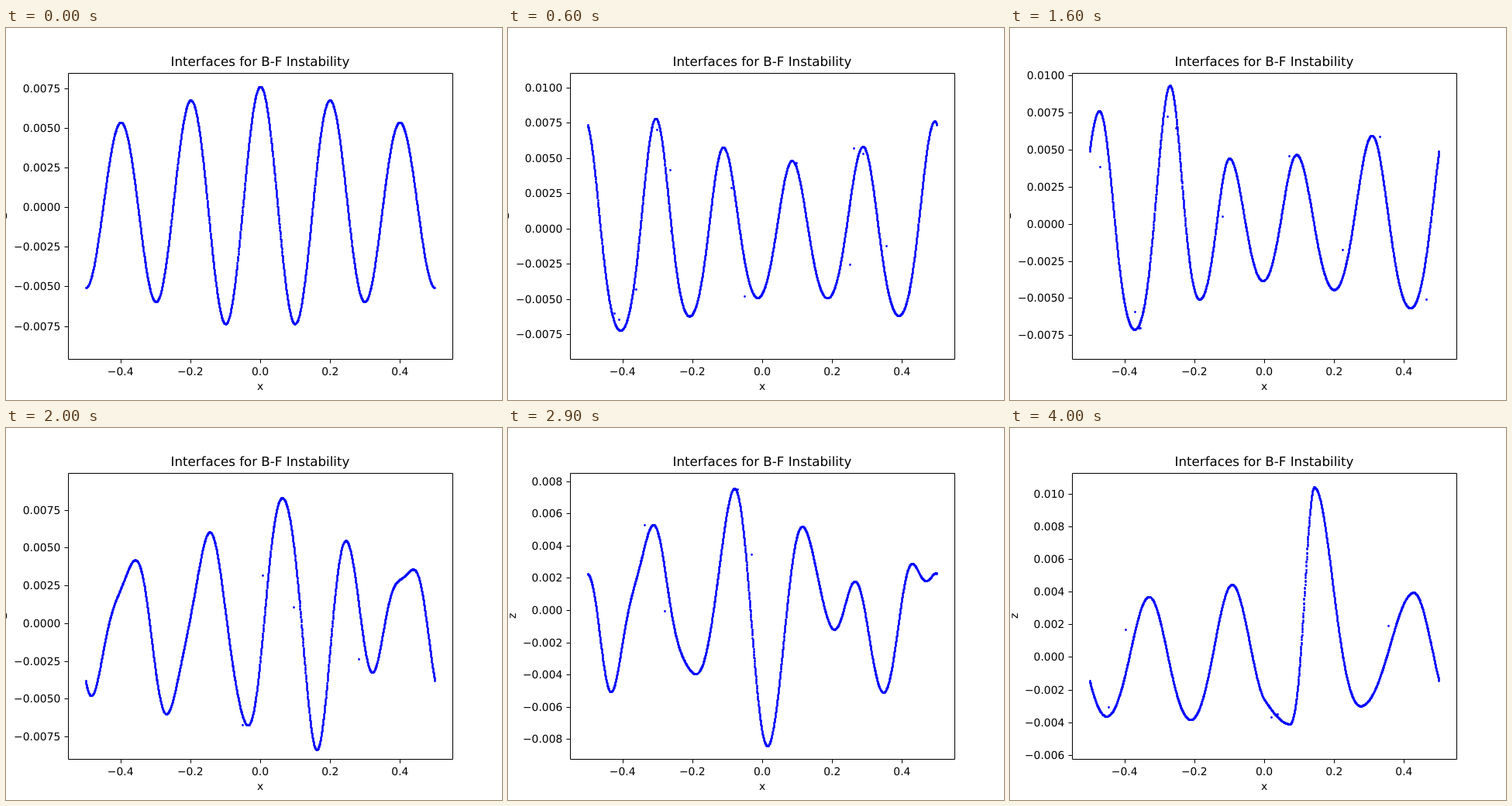
Recreate the animation shown at these times as an HTML page. Size 640 by 480 pixels, loop 4100 ms.

```html
<!DOCTYPE html>
<html lang="en">
<head>
<meta charset="utf-8">
<title>Interfaces for B-F Instability</title>
<style>
  html, body { margin: 0; width: 100%; height: 100%; overflow: hidden; background: #fff; }
  svg { display: block; width: 640px; height: 480px; }
  text {
    font: 13.889px "DejaVu Sans", sans-serif; fill: #000;
    text-anchor: middle; text-rendering: geometricPrecision;
  }
  .title { font-size: 16.667px; }
  #yTicks text { text-anchor: end; }
  .axes { fill: none; stroke: #000; stroke-width: 1; }
  #dots { fill: none; stroke: #00f; stroke-width: 2.8; stroke-linecap: round; }
</style>
</head>
<body>
<svg viewBox="0 0 640 480">
  <path id="dots"/>
  <path class="axes" d="M80.5 58.5H576.5V427.5H80.5Z"/>
  <g id="xTicks"></g>
  <g id="yTicks"></g>
  <text class="title" x="328" y="49">Interfaces for B-F Instability</text>
  <text x="328" y="467">x</text>
  <text id="zLabel">z</text>
</svg>
<script>
const TAU = 2 * Math.PI;
const STEP = 100, FRAMES = 41;
const MODES = 12, SAMPLES = 256, DOTS = 2600;
const SPEED = 0.183;              // carrier phase speed, domain lengths per step
const TOP = 57.6, BOTTOM = 427.2;

const $ = id => document.getElementById(id);
const lerp = (a, b, s) => a + (b - a) * s;
const rand = n => { const v = Math.sin(n * 12.9898 + 4.1) * 43758.5453; return v - Math.floor(v); };
const px = x => 80 + (x + 0.55) * 496 / 1.1;
// Markers and ticks sit on whole pixels.
const snapX = x => Math.round(x) + 0.5;
const snapY = y => Math.floor(y) + 0.5;

// Periodic curve through crests given as x in 1/1000 and z in 1/10000.
// Distant crests get a trough halfway, as deep as `depth` times their harmonic mean.
function profile(depth, flat) {
  const base = [];
  const count = flat.length / 2;
  for (let i = 0; i < count; i++) {
    const j = (i + 1) % count;
    const x = flat[2 * i] / 1e3, z = flat[2 * i + 1] / 1e4;
    const nextX = flat[2 * j] / 1e3 + (j ? 0 : 1), nextZ = flat[2 * j + 1] / 1e4;
    base.push([x, z]);
    if (z > 0 && nextZ > 0 && nextX - x > 0.1)
      base.push([(x + nextX) / 2, -depth * 2 * z * nextZ / (z + nextZ)]);
  }
  const pts = [-1, 0, 1].flatMap(k => base.map(([x, z]) => [x + k, z]));
  const slope = pts.map((p, i) => {
    if (!i || i === pts.length - 1) return 0;
    const [a, b] = [pts[i - 1], pts[i + 1]];
    const d0 = (p[1] - a[1]) / (p[0] - a[0]), d1 = (b[1] - p[1]) / (b[0] - p[0]);
    return d0 * d1 <= 0 ? 0 : 2 * d0 * d1 / (d0 + d1);
  });
  return x => {
    let i = 0;
    while (i < pts.length - 2 && pts[i + 1][0] <= x) i++;
    const [[x0, z0], [x1, z1]] = [pts[i], pts[i + 1]];
    const h = x1 - x0, u = (x - x0) / h, v = 1 - u;
    if (!slope[i] && !slope[i + 1]) {       // crest to trough: second-order Stokes wave
      const half = Math.abs(z1 - z0) / 2, a = Math.PI * (z0 > z1 ? u : v);
      const e = Math.min(0.14, 15.7 * half);
      return (z0 + z1) / 2 + half * (Math.cos(a) + e * (Math.cos(2 * a) - 1));
    }
    return z0 * (1 + 2 * u) * v * v + h * slope[i] * u * v * v
         + z1 * (3 - 2 * u) * u * u - h * slope[i + 1] * u * u * v;
  };
}

function spectrum(f) {
  return Array.from({ length: MODES + 1 }, (_, n) => {
    let c = 0, s = 0;
    for (let i = 0; i < SAMPLES; i++) {
      const x = i / SAMPLES - 0.5, z = f(x);
      c += z * Math.cos(TAU * n * x);
      s += z * Math.sin(TAU * n * x);
    }
    return { mag: Math.hypot(c, s) * (n ? 2 : 1) / SAMPLES, phase: Math.atan2(s, c) };
  });
}

// Deep-water dispersion for free waves, carrier speed for bound harmonics.
const omega = n => TAU * SPEED * (n < 8 ? Math.sqrt(5 * n) : n);

const states = [];
const state = (at, lo, hi, f) => states.push({ at, lo, hi, f, modes: spectrum(f) });

state(0, -0.00956, 0.0085,
  x => (0.00635 + 0.00125 * Math.cos(TAU * x)) * Math.cos(5 * TAU * x));
state(6, -0.00924, 0.01107,
  profile(0.94, [-305, 78, -112, 57.5, 85, 48, 288, 58, 493, 76]));
state(11, -0.00823, 0.01002,
  profile(0.87, [-405, 49, -193, 54, 19, 75, 217, 92, 397, 59]));
state(16, -0.00908, 0.0102,
  profile(0.85, [-472, 76, -270, 93, -100, 44, 92, 46.5, 308, 59.5]));
state(24, -0.00961, 0.01151,
  profile(0.83, [-405, 105, -340, -29, -262, 34, -50, 43, 172, 54, 402, 78]));
state(34, -0.01045, 0.0071,
  profile(0.9, [-444, -83, -383, 43, -308, 20, -270, 23, -147, -38, -36, 40, 193, 41.5, 440, 62.5]));
state(40, -0.00623, 0.01132,
  profile(0.95, [-330, 37, -92, 44.5, 0, -26, 73, -41, 143, 104, 275, -30, 427, 39.5]));

// Surface between two states: mode sizes blend, phases travel at their own speed.
function between(a, b, s) {
  const span = b.at - a.at;
  const waves = a.modes.map((m, n) => {
    const end = b.modes[n], run = omega(n) * span;
    const miss = end.phase - m.phase - run;
    const turn = run + miss - TAU * Math.round(miss / TAU);
    return n ? { n, mag: lerp(m.mag, end.mag, s), phase: m.phase + turn * s }
      : { n, mag: lerp(m.mag * Math.cos(m.phase), end.mag * Math.cos(end.phase), s), phase: 0 };
  });
  return x => waves.reduce((z, w) => z + w.mag * Math.cos(TAU * w.n * x - w.phase), 0);
}

function scene(k) {
  const key = states.find(s => s.at === k);
  if (key) return key;
  const i = states.findIndex(s => s.at > k), a = states[i - 1], b = states[i];
  const s = (k - a.at) / (b.at - a.at), f = between(a, b, s);
  let min = 0, max = 0;
  for (let j = 0; j <= SAMPLES; j++) {
    const z = f(j / SAMPLES - 0.5);
    min = Math.min(min, z);
    max = Math.max(max, z);
  }
  const tight = 1 - 0.08 * Math.sin(Math.PI * s);
  const lo = Math.min(lerp(a.lo, b.lo, s) * tight, min - 0.0006);
  const hi = Math.max(lerp(a.hi, b.hi, s) * tight, max + 0.0006);
  return { lo, hi, f };
}

const label = (v, digits) => (v < 0 ? "\u2212" : "") + Math.abs(v).toFixed(digits);

function draw(k) {
  const { lo, hi, f } = scene(k);
  const py = z => BOTTOM - (z - lo) / (hi - lo) * (BOTTOM - TOP);

  const dots = new Set();
  const dot = (x, z) => dots.add(`M${snapX(px(x))} ${snapY(py(z))}h0`);
  for (let i = 0; i <= DOTS; i++) {
    const x = (i + 0.7 * (rand(i) - 0.5)) / DOTS - 0.5;
    dot(x, f(x));
  }
  // Stray markers thrown sideways off the surface.
  const strays = k === 0 ? 0 : k < 20 ? 14 : 5;
  for (let i = 0; i < strays; i++) {
    const x = rand(k * 31 + i) * 0.92 - 0.46;
    dot(x + (rand(k * 57 + i + 9) - 0.5) * 0.06, f(x));
  }
  $("dots").setAttribute("d", [...dots].join(""));

  const range = hi - lo;
  const step = range <= 0.018 ? 0.002 : range <= 0.0225 ? 0.0025 : 0.005;
  const digits = step === 0.0025 ? 4 : 3;
  let ticks = "";
  for (let n = Math.ceil(lo / step); n * step <= hi; n++) {
    const y = snapY(py(n * step));
    ticks += `<path class="axes" d="M75.5 ${y}H80.5"/>`
      + `<text x="70.3" y="${y + 4.5}">${label(n * step, digits)}</text>`;
  }
  $("yTicks").innerHTML = ticks;
  const width = 13.889 * (1.156 + 0.636 * (digits + 1));
  $("zLabel").setAttribute("transform", `translate(${(61.5 - width).toFixed(1)} 242.4) rotate(-90)`);
}

$("xTicks").innerHTML = [-0.4, -0.2, 0, 0.2, 0.4].map(v =>
  `<path class="axes" d="M${snapX(px(v))} 427.5v5"/><text x="${px(v)}" y="448">${label(v, 1)}</text>`
).join("");

const start = performance.now();
let shown = -1;
function tick() {
  const k = Math.floor((performance.now() - start) / STEP) % FRAMES;
  if (k !== shown) draw(shown = k);
  requestAnimationFrame(tick);
}
tick();
</script>
</body>
</html>
```
